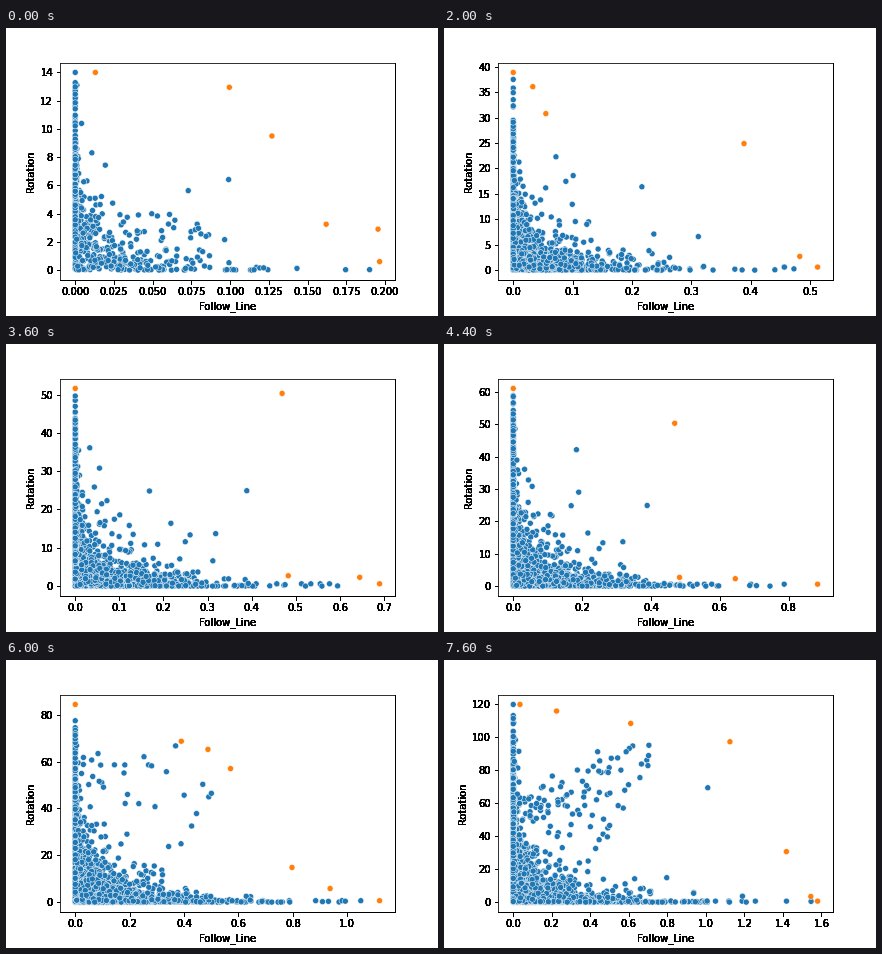
These frames come from a looping animation (432x288 px, 8000 ms). A matplotlib script:

```python
import numpy as np
import matplotlib.pyplot as plt
from matplotlib.animation import FuncAnimation

FRAMES, INTERVAL = 20, 400
BLUE, ORANGE = "#1f77b4", "#ff7f0e"
TEXT_LAYERS = 12  # stacked axes give the heavy, hard-edged lettering

# Largest value reached on each axis, as (step, value), linear in between.
X_GROWTH = [(0, .1965), (2, .32), (3, .457), (4, .457), (5, .513), (8, .5765),
            (9, .69), (12, .981), (13, .981), (17, 1.257), (19, 1.58)]
Y_GROWTH = [(0, 14), (2, 22.8), (5, 38.9), (9, 51.6), (13, 70.5), (17, 98.3), (19, 119.8)]

# Lasting corners of the front: (first step, x, y).
CORNERS = [
    (0, .013, 14), (0, .0995, 12.95), (0, .127, 9.5), (0, .162, 3.25), (0, .1955, 2.9),
    (1, .101, 18.6), (1, .237, 7.1), (2, .072, 22.3), (2, .312, 6.6),
    (5, .033, 36.1), (5, .055, 30.8), (5, .389, 24.9), (5, .483, 2.7),
    (9, .469, 50.3), (9, .645, 2.3), (12, .797, 14.8), (12, .937, 5.8),
    (13, .39, 68.7), (13, .488, 65.2), (13, .571, 57), (16, 1.01, 69.3),
    (17, 1.125, 97.2), (17, 1.19, 3.6), (18, .61, 108.3), (18, 1.418, 30.6),
    (19, .035, 119.8), (19, .225, 115.8), (19, 1.545, 3.4),
]

rng = np.random.default_rng(12)


def points_of(x, y):
    return np.column_stack([x, y])


def star(count, x_max, y_max):
    """Bulk that hugs both axes inside a concave, star-like curve."""
    reach = rng.normal(.74, .16, count).clip(.05, 1.1)
    share = rng.beta(1, 1.3, count)
    return points_of(x_max * (reach * share) ** 2.5,
                     y_max * (reach * (1 - share)) ** 2.5)


def column(count, y_max):
    return points_of(np.zeros(count), .97 * y_max * rng.random(count) ** 1.2)


def low_band(count, x_max):
    return points_of(.45 * x_max * rng.random(count) ** 1.3, 4 * rng.random(count) ** 1.5)


def strays(count, x_max, y_max):
    return points_of(.6 * x_max * rng.random(count) ** 1.5,
                     .75 * y_max * rng.random(count) ** 1.5)


def rising_cloud(count):
    x = rng.uniform(.03, .72, count)
    return points_of(x, 55 + 48 * x + rng.normal(0, 10, count))


def dominated(points, leaders):
    return (points[:, None] <= leaders[None]).all(axis=2).any(axis=1)


def front_mask(points):
    order = np.lexsort((-points[:, 1], -points[:, 0]))
    y = points[order, 1]
    best_before = np.r_[-1, np.maximum.accumulate(y)[:-1]]
    mask = np.zeros(len(points), bool)
    mask[order] = y > best_before
    return mask


def build_steps():
    steps, points, leaders = [], np.empty((0, 2)), np.empty((0, 2))
    for step in range(FRAMES):
        x_max = np.interp(step, *zip(*X_GROWTH))
        y_max = np.interp(step, *zip(*Y_GROWTH))
        records = np.array([(0, y_max), (x_max, .6)]
                           + [(x, y) for first, x, y in CORNERS if first == step])
        leaders = np.vstack([leaders, records])
        size = 2 if step == 0 else 1
        fresh = np.vstack([star(180 * size, x_max, y_max),
                           column(45 * size, y_max),
                           low_band(35 * size, x_max),
                           strays(6 * size, x_max, y_max),
                           rising_cloud(18 if step >= 14 else 0)])
        fresh = fresh[dominated(fresh, leaders)]
        points = np.vstack([points, fresh, records])
        steps.append(points)
    return steps


steps = build_steps()

plt.rcParams.update({"font.family": "DejaVu Sans", "font.size": 10})
fig = plt.figure(figsize=(6, 4), dpi=72, facecolor="white")
fig.subplots_adjust(left=.125, right=.9, bottom=.125, top=.88)
ax = fig.add_subplot()
layers = [ax] + [fig.add_subplot(sharex=ax, sharey=ax, facecolor="none", zorder=-1)
                 for _ in range(TEXT_LAYERS - 1)]
for layer in layers:
    layer.set(xlabel="Follow_Line", ylabel="Rotation")
dots = ax.scatter([], [], s=36, linewidths=.48, edgecolors="white")


def update(step):
    points = steps[step]
    mask = front_mask(points)
    dots.set_offsets(np.vstack([points[~mask], points[mask]]))
    dots.set_facecolor([BLUE] * (~mask).sum() + [ORANGE] * mask.sum())
    x_max, y_max = points.max(axis=0)
    ax.set_xlim(-.05 * x_max, 1.05 * x_max)
    ax.set_ylim(-.05 * y_max, 1.05 * y_max)
    return dots,


anim = FuncAnimation(fig, update, frames=FRAMES, interval=INTERVAL,
                     repeat=True, repeat_delay=0)
plt.show()
```
